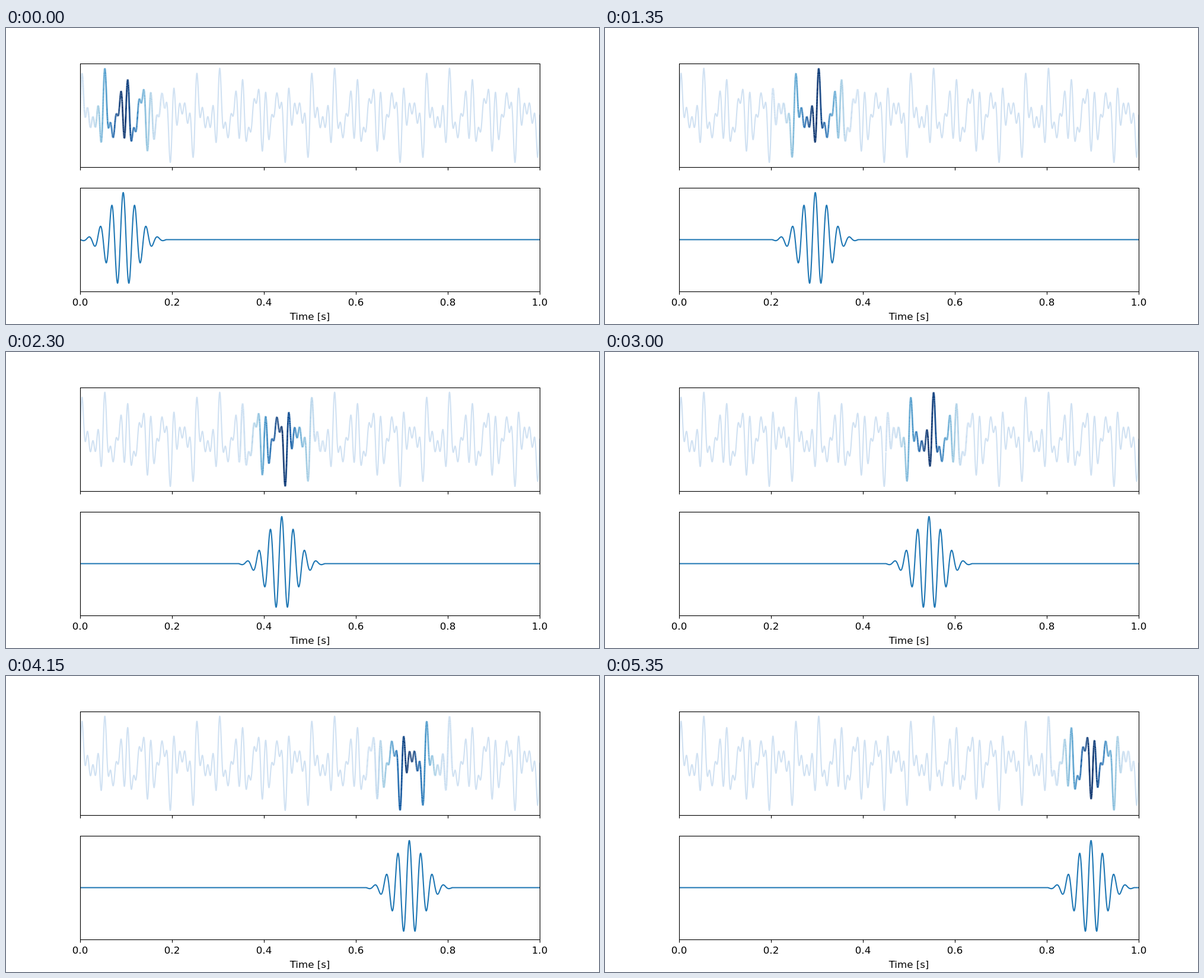
An HTML page with a canvas that plays this animation: 1000 px wide and 500 px high, repeating every 5400 ms.

```html
<!DOCTYPE html>
<html lang="en">
<head>
<meta charset="utf-8">
<title>Sliding wavelet</title>
<style>
  html, body { margin: 0; width: 100%; height: 100%; overflow: hidden; background: #fff; }
  canvas, svg { position: absolute; left: 0; top: 0; width: 1000px; height: 500px; }
  text { font: 16.667px "DejaVu Sans", sans-serif; text-anchor: middle; }
  rect, path { fill: none; stroke: #000; stroke-width: 1.11; }
</style>
</head>
<body>
<canvas id="plot" width="1000" height="500"></canvas>
<svg id="axes" viewBox="0 0 1000 500">
  <rect x="125.5" y="60.5" width="775" height="175"/>
  <rect x="125.5" y="270.5" width="775" height="175"/>
  <text x="512.5" y="493">Time [s]</text>
</svg>
<script>
const RATE = 10000;            // samples per second
const STEP = 75;               // samples the window moves per frame
const WINDOW = 1875;           // window length in samples
const FRAME_MS = 50, FRAMES = 108;
const LEFT = 125, WIDTH = 775, HEIGHT = 175;
const TOP_MID = 147.5, LOW_MID = 357.5;
const AMP = HEIGHT / 2.2;
const SIGMA = 1 / 32;
const BLUES = ['f7fbff', 'deebf7', 'c6dbef', '9ecae1', '6baed6', '4292c6', '2171b5', '08519c', '08306b']
  .map(hex => [0, 2, 4].map(i => parseInt(hex.substr(i, 2), 16)));

const ctx = document.getElementById('plot').getContext('2d');
const px = i => LEFT + WIDTH * i / RATE;

function blues(v) {
  const pos = Math.min(v, 1) * (BLUES.length - 1);
  const k = Math.min(Math.floor(pos), BLUES.length - 2);
  return `rgb(${BLUES[k].map((c, j) => Math.round(c + (BLUES[k + 1][j] - c) * (pos - k)))})`;
}

const signal = Array.from({ length: RATE + 1 }, (_, i) =>
  [24, 40, 60, 80].reduce((sum, f) => sum + Math.sin(2 * Math.PI * f * i / RATE), 0));
const peak = Math.max(...signal);
const signalY = signal.map(v => TOP_MID - AMP * v / peak);

const envelope = [], waveletY = [];
for (let i = 0; i <= WINDOW; i++) {
  const t = (i - WINDOW / 2) / RATE;
  envelope[i] = Math.exp(-t * t / (2 * SIGMA * SIGMA));
  waveletY[i] = LOW_MID - AMP * envelope[i] * Math.cos(2 * Math.PI * 40 * t);
}
const shades = envelope.map(e => blues(0.2 + 0.8 * e));

function curve(from, to, yAt, color) {
  if (to <= from) return;
  ctx.beginPath();
  for (let i = from; i <= to; i++) ctx.lineTo(px(i), yAt(i));
  ctx.lineWidth = 2.083;
  ctx.lineCap = 'square';
  ctx.lineJoin = 'round';
  ctx.strokeStyle = color;
  ctx.stroke();
}

// Separate butt-ended pieces give the window its beaded look.
function shadedWindow(start) {
  ctx.lineWidth = 2.778;
  ctx.lineCap = 'butt';
  for (let i = 0; i < WINDOW - 1; i++) {
    const n = start + i;
    ctx.beginPath();
    ctx.moveTo(px(n), signalY[n]);
    ctx.lineTo(px(n + 1), signalY[n + 1]);
    ctx.strokeStyle = shades[i];
    ctx.stroke();
  }
}

function draw(frame) {
  const start = frame * STEP, end = start + WINDOW;
  ctx.clearRect(0, 0, 1000, 500);
  ctx.save();
  ctx.beginPath();
  ctx.rect(LEFT, 60, WIDTH, HEIGHT);
  ctx.rect(LEFT, 270, WIDTH, HEIGHT);
  ctx.clip();
  shadedWindow(start);
  curve(0, start - 1, i => signalY[i], blues(0.2));
  curve(end, RATE, i => signalY[i], blues(0.2));
  curve(0, RATE, i => waveletY[i - start] ?? LOW_MID, '#1f77b4');
  ctx.restore();
}

function addAxisPart(name, attrs, label = '') {
  const el = document.createElementNS('http://www.w3.org/2000/svg', name);
  for (const key in attrs) el.setAttribute(key, attrs[key]);
  el.textContent = label;
  document.getElementById('axes').append(el);
}
for (let k = 0; k <= 5; k++) {
  const x = LEFT + k * WIDTH / 5;
  addAxisPart('path', { d: `M${x + 0.5} 235.5v4.9M${x + 0.5} 445.5v4.9` });
  addAxisPart('text', { x, y: 469 }, (k / 5).toFixed(1));
}

let shown = -1;
const origin = performance.now();
function tick() {
  const frame = Math.floor(Math.max(0, performance.now() - origin) / FRAME_MS) % FRAMES;
  if (frame !== shown) draw(shown = frame);
  requestAnimationFrame(tick);
}
tick();
</script>
</body>
</html>
```
